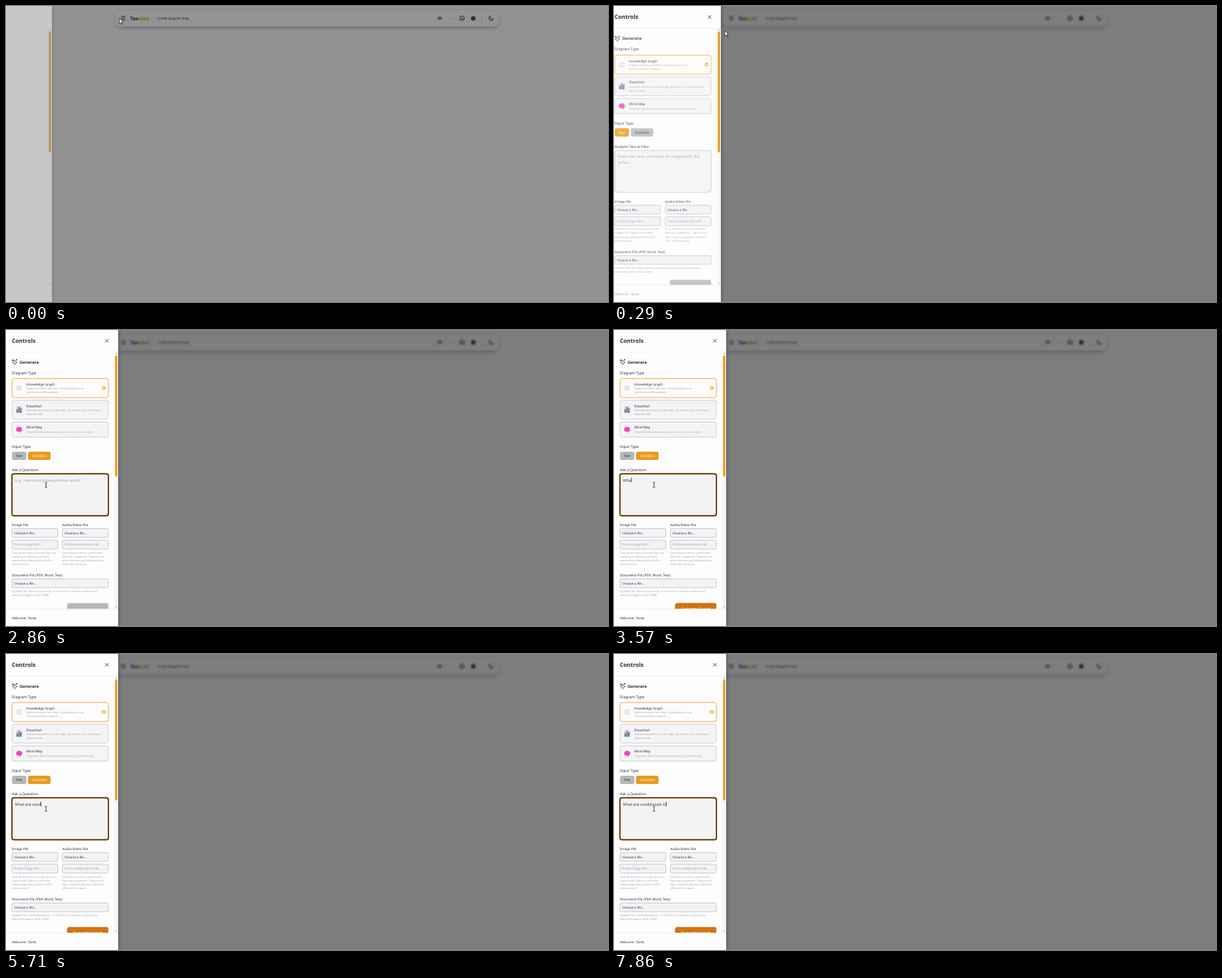
Write an HTML page that moves like this. It is 800 px wide and 394 px high and loops after 8000 ms.

```html
<!DOCTYPE html>
<html lang="en">
<head>
<meta charset="utf-8">
<title>Diagram controls</title>
<style>
  html, body { margin: 0; width: 100%; height: 100%; overflow: hidden; background: #7e7e80; }
  svg { display: block; width: 800px; height: 394px; }
  text { font-family: "Noto Sans", "Open Sans", sans-serif; text-rendering: geometricPrecision; fill: #2b2f36; white-space: pre; }
  .title { font-size: 7.5px; font-weight: 700; }
  .section { font-size: 5.55px; font-weight: 600; }
  .label { font-size: 5px; font-weight: 500; }
  .small { font-size: 4.5px; font-weight: 500; }
  .hint { font-size: 3.72px; fill: #a9adb5; }
  .body { font-size: 5px; }
  .pick { font-size: 4.33px; }
  .ghost { fill: #9da1aa; }
  .mid { text-anchor: middle; }
  .white { fill: #fff; }
  .box { fill: #f3f3f6; stroke: #b6b8c2; stroke-width: .7; }
  .card { fill: #f4f4f6; stroke: #c2c3c9; stroke-width: .7; }
  .off { fill: #b6b6bc; }
  .on { fill: #e99c18; }
  .line { fill: none; stroke: #333; stroke-width: .8; stroke-linecap: round; }
  .cursor { fill: #fff; stroke: #111; stroke-width: .7; stroke-linejoin: round; }
</style>
</head>
<body>
<svg viewBox="0 0 800 394">
  <defs>
    <clipPath id="scroll"><rect y="29.5" width="143" height="341.5"/></clipPath>
    <filter id="soft" x="-5%" y="-80%" width="110%" height="300%"><feGaussianBlur stdDeviation="2.5"/></filter>
    <linearGradient id="edge">
      <stop offset="0" stop-opacity=".16"/><stop offset="1" stop-opacity="0"/>
    </linearGradient>
  </defs>

  <rect width="800" height="394" fill="#fbfbfc"/>
  <g id="page">
    <rect x="146" y="8" width="508" height="21" rx="6" opacity=".3" filter="url(#soft)"/>
    <rect x="145" y="6" width="510" height="21.5" rx="6" fill="#fdfdfe"/>
    <path class="line" d="M153.5 14h5M153.5 16.3h5M153.5 18.6h5"/>
    <text x="165" y="18.6" font-size="6.6" font-weight="700">Tav<tspan fill="#e99c18">olen</tspan></text>
    <text x="201" y="17.8" font-size="4.4">Create diagram view</text>
    <path class="line" d="M573.5 16.3q3-3.6 6 0q-3 3.6-6 0z"/>
    <circle cx="576.5" cy="16.3" r=".9" fill="#333"/>
    <path class="line" d="M589 18l2-3 2 3" opacity=".25"/>
    <rect class="line" x="603.2" y="13.8" width="5.6" height="5" rx="1"/>
    <path class="line" d="M604 17.8l2-2 2 2"/>
    <circle cx="621" cy="16.4" r="3" fill="#3b3b3f"/>
    <path d="M618.5 16.4h5M621 13.7v5.4" stroke="#999" stroke-width=".5"/>
    <path d="M632.5 12v9" stroke="#ccc" stroke-width=".6"/>
    <path class="line" d="M643.3 13.4a3.2 3.2 0 1 0 4.5 4.2a3.4 3.4 0 0 1-4.5-4.2z"/>
  </g>
  <rect id="shade" width="800" height="394"/>

  <g id="panel">
    <rect x="149" width="5" height="394" fill="url(#edge)"/>
    <rect width="149" height="394" fill="#fdfdfe"/>
    <path d="M0 29.3h149M0 371.5h149" stroke="#e6e8ec" stroke-width=".6"/>

    <g id="head">
      <text class="title" x="7.7" y="17.2">Controls</text>
      <path class="line" d="M132 12.4l4 4m0-4l-4 4" stroke-width=".7"/>
    </g>

    <g clip-path="url(#scroll)"><g id="content">
      <path d="M11.6 40.2q.5 2.6 3.2 3.1q-2.7.5-3.2 3.1q-.5-2.6-3.2-3.1q2.7-.5 3.2-3.1z" fill="none" stroke="#333" stroke-width=".7"/>
      <path class="line" d="M9 39.3v2M8 40.3h2M14 39v1.4M13.3 39.7h1.4" stroke-width=".6"/>
      <text class="section" x="18" y="44.5">Generate</text>

      <text class="label" x="7.7" y="58.5">Diagram Type</text>
      <rect x="8" y="64.6" width="128" height="25.4" rx="3" fill="#fdfcfa" stroke="#e9ac45" stroke-width=".9"/>
      <g fill="none" stroke="#c6c8ce" stroke-width=".6">
        <circle cx="17.3" cy="77.2" r="3.4"/><path d="M13.9 76h6.8M14.2 78.6h6.2M17.3 73.8v6.8"/>
      </g>
      <circle cx="129.8" cy="77.2" r="1.8" fill="#fff" stroke="#e99c18" stroke-width="1.2"/>
      <text class="small" x="27" y="73.8">Knowledge Graph</text>
      <text class="hint" x="27" y="79.1">Explore entities and their relationships in an</text>
      <text class="hint" x="27" y="84.2">interconnected network.</text>

      <rect class="card" x="8" y="93.4" width="128" height="25.2" rx="3"/>
      <rect x="13.3" y="101.6" width="8" height="8.8" rx="1" fill="#d9dbe6"/>
      <rect x="14" y="105.5" width="2" height="4.6" fill="#35a35c"/>
      <rect x="16.4" y="102.3" width="2" height="7.8" fill="#d74a9a"/>
      <rect x="18.8" y="104.2" width="2" height="5.9" fill="#5578d8"/>
      <text class="small" x="27" y="102.5">Flowchart</text>
      <text class="hint" x="27" y="108">Visualize processes, code logic, decisions, and workflows</text>
      <text class="hint" x="27" y="113.1">step-by-step.</text>

      <rect class="card" x="8" y="122.3" width="128" height="20.2" rx="3"/>
      <path d="M13.3 132.5c0-3 2.5-4 4.5-3.8c2.5 0 4 2 3.7 4.2c-.2 1.6-1.2 2.2-2 2.2l-.4 1.5h-1.2l-.6-1.4c-2.2.5-4-.6-4-2.7z" fill="#f04fc4"/>
      <path d="M15 132q1.5-1.6 3 0t2.4-.2M16 134q1-.8 2 0" fill="none" stroke="#c92b9c" stroke-width=".5"/>
      <text class="small" x="27" y="131.2">Mind Map</text>
      <text class="hint" x="27" y="137">Organize ideas hierarchically around a central topic.</text>

      <text class="label" x="7.7" y="157.2">Input Type</text>
      <rect class="off" x="8" y="162" width="19" height="11" rx="2.5"/>
      <text class="small mid" x="17.4" y="169.2" fill="#555">Text</text>
      <rect class="off" x="29.5" y="162" width="29.6" height="11" rx="2.5"/>
      <text class="small mid" x="44.3" y="169.2">Question</text>
      <g id="textOn">
        <rect class="on" x="8" y="162" width="19" height="11" rx="2.5"/>
        <text class="small mid white" x="17.4" y="169.2">Text</text>
      </g>
      <g id="askOn">
        <rect class="on" x="29.5" y="162" width="29.6" height="11" rx="2.5"/>
        <text class="small mid white" x="44.3" y="169.2" font-weight="600">Question</text>
      </g>

      <text class="label" id="prompt" x="7.7" y="187.8"></text>
      <rect class="box" x="8" y="191.5" width="128" height="55.7" rx="3"/>
      <g id="focus" fill="none">
        <rect x="8" y="191.5" width="128" height="55.7" rx="2.6" stroke="#e0a23a" stroke-width="2"/>
        <rect x="7.8" y="191.3" width="128.4" height="56.1" rx="2.8" stroke="#33240a" stroke-width="1.2"/>
      </g>
      <path d="M132.3 246l2.6-2.6M134 246l1-1" stroke="#888" stroke-width=".4"/>
      <text class="body" id="line1" x="12" y="201.7"></text>
      <text class="body ghost" id="line2" x="12" y="209.6">below...</text>
      <rect id="caret" y="196.6" width=".7" height="6" fill="#111"/>

      <text class="small" x="7.7" y="261">Image File</text>
      <text class="small" x="74.7" y="261">Audio/Video File</text>
      <rect class="box" x="8" y="264.4" width="61" height="11.6" rx="2"/>
      <rect class="box" x="75" y="264.4" width="61" height="11.6" rx="2"/>
      <text class="pick" x="10.8" y="271.8">Choose a file...</text>
      <text class="pick" x="77.8" y="271.8">Choose a file...</text>
      <rect class="box" x="8" y="279.8" width="61" height="11.8" rx="2"/>
      <rect class="box" x="75" y="279.8" width="61" height="11.8" rx="2"/>
      <text class="pick ghost" x="10.8" y="287.2">Paste image URL...</text>
      <text class="pick ghost" x="77.8" y="287.2">Paste audio/video URL...</text>
      <text class="hint">
        <tspan x="7.7" y="297.5">Only direct links to image files are</tspan>
        <tspan x="7.7" y="302.7">supported. Clipova and other</tspan>
        <tspan x="7.7" y="307.9">streaming/video platform URLs</tspan>
        <tspan x="7.7" y="313.1">will not work.</tspan>
        <tspan x="74.7" y="297.5">Only direct links to audio/video</tspan>
        <tspan x="74.7" y="302.7">files are supported. Clipova and</tspan>
        <tspan x="74.7" y="307.9">other streaming/video platform</tspan>
        <tspan x="74.7" y="313.1">URLs will not work.</tspan>
      </text>

      <text class="small" x="7.7" y="328">Document File (PDF, Word, Text)</text>
      <rect class="box" x="8" y="331.4" width="128" height="11.6" rx="2"/>
      <text class="pick" x="10.8" y="338.8">Choose a file...</text>
      <text class="hint" x="7.7" y="349.2">Upload PDF, Word documents, or text files to extract content and</text>
      <text class="hint" x="7.7" y="354.3">generate graphs. Max 20MB.</text>

      <rect class="off" x="81.2" y="363.6" width="54.8" height="14" rx="2.5"/>
      <g id="goOn">
        <rect x="81.2" y="363.6" width="54.8" height="14" rx="2.5" fill="#d2720c"/>
        <text class="mid white" x="108.8" y="372.6" font-size="4.95" font-weight="600">Generate Graph</text>
      </g>
    </g></g>

    <rect x="144.6" y="29.6" width="3.6" height="341.6" fill="#f6f5f3"/>
    <rect x="144.8" y="34.3" width="3.1" height="160.4" fill="#e5a02a"/>
    <path d="M145.2 32.2l1.2-1.6 1.2 1.6zM145.2 368.4l1.2 1.6 1.2-1.6z" fill="#dd9a22"/>
    <text id="foot" x="7.7" y="384.6" font-size="4.33">Welcome, Tarvik</text>
  </g>

  <g id="mouse">
    <path id="arrow" class="cursor" d="M0 0v7l1.7-1.5 1.2 2.6 1.2-.5-1.2-2.6h2.2z"/>
    <path id="hand" class="cursor" d="M-.8.8q.8-1.4 1.6 0v3.2q1.1-.7 1.5.3q1.1-.5 1.4.4q1.1-.2 1.1 1v1.8q0 2.3-2 2.7h-2.2q-1.2-.4-2-1.8l-1.9-2.6q.5-1.3 2.5.6z"/>
    <path id="beam" d="M-1.5-3.2q1.5 0 1.5.8q0-.8 1.5-.8M0-2.4v5M-1.5 3.4q1.5 0 1.5-.8q0 .8 1.5.8" fill="none" stroke="#222" stroke-width=".8"/>
  </g>
</svg>
<script>
  const LOOP = 8000, STEP = 1000 / 7;
  const QUERY = "What are conditionals in";
  // [step, characters typed]; one more per step until the cap in the third value
  const BURSTS = [[24, 1, 1], [25, 3, 3], [27, 4, 7], [32, 8, 9], [35, 10, 12],
                  [39, 13, 13], [42, 14, 19], [49, 20, 21], [52, 22, 22], [54, 23, 24]];
  const SLIDE = [-88, -28, -7, -1.5, 0], PANEL = [.5, .88, 1], SHADE = [.42, .495, .5];
  const FADE = [.02, .4, .8, 1], RISE = [5, 2.6, .8, 0], FOOT = [0, 0, .4, .8, 1];
  const HEAD_Y = [2.6, 1.2, .3, 0], HEAD = [.12, .9, 1], BLUR = [.35, .9, 1.05];

  const $ = id => document.getElementById(id);
  const at = (list, k) => list[Math.min(k, list.length - 1)];
  const ramp = (k, from, to) => Math.min(1, Math.max(0, (k - from) / (to - from)));
  const ease = u => u * u * (3 - 2 * u);
  const show = (id, v) => $(id).setAttribute("opacity", +v);
  const move = (id, x, y) => $(id).setAttribute("transform", `translate(${x} ${y})`);

  function typed(k) {
    let n = 0;
    for (const [start, from, cap] of BURSTS)
      if (k >= start) n = Math.min(cap, from + k - start);
    return n;
  }

  function pointer(k) {
    if (k < 1) return [150.8, 16.6];
    const a = ease(ramp(k, 1, 8)), b = ease(ramp(k, 12, 16));
    return [153.2 - 110.4 * a + 10.4 * b, 25.4 + 136.8 * a + 43.8 * b];
  }

  function draw(t) {
    const k = Math.floor((t % LOOP + 5) / STEP) % 56;

    move("panel", at(SLIDE, k), 0);
    show("panel", at(PANEL, k));
    show("shade", at(SHADE, k));
    $("page").style.filter = `blur(${at(BLUR, k)}px)`;
    move("head", 0, at(HEAD_Y, k));
    show("head", at(HEAD, k));
    move("content", 0, at(RISE, k));
    show("content", at(FADE, k));
    show("foot", at(FOOT, k));

    const asking = k >= 10, n = typed(k);
    const swap = ramp(k, 9, 11);
    show("textOn", 1 - swap);
    show("askOn", swap);
    show("goOn", ramp(k, 23, 25));
    show("focus", k >= 17);
    $("prompt").textContent = asking ? "Ask a Question" : "Analyze Text & Files";

    const line = $("line1");
    line.setAttribute("class", n ? "body" : "body ghost");
    line.textContent = n ? QUERY.slice(0, n)
      : asking ? "e.g., How does photosynthesis work?"
      : "Paste text here, or provide an image/audio file";
    show("line2", !asking);
    $("caret").setAttribute("x", 12.1 + (n ? line.getSubStringLength(0, n) : 0));
    show("caret", n > 0 || (k >= 17 && k < 20));

    const [x, y] = pointer(k);
    const beam = x < 136 && y > 191, hand = !beam && x < 59 && y > 160 && y < 174;
    move("mouse", x, y);
    show("beam", beam);
    show("hand", hand);
    show("arrow", !beam && !hand);
  }

  const begin = performance.now();
  function tick() {
    draw(performance.now() - begin);
    requestAnimationFrame(tick);
  }
  draw(0);
  requestAnimationFrame(tick);
</script>
</body>
</html>
```
